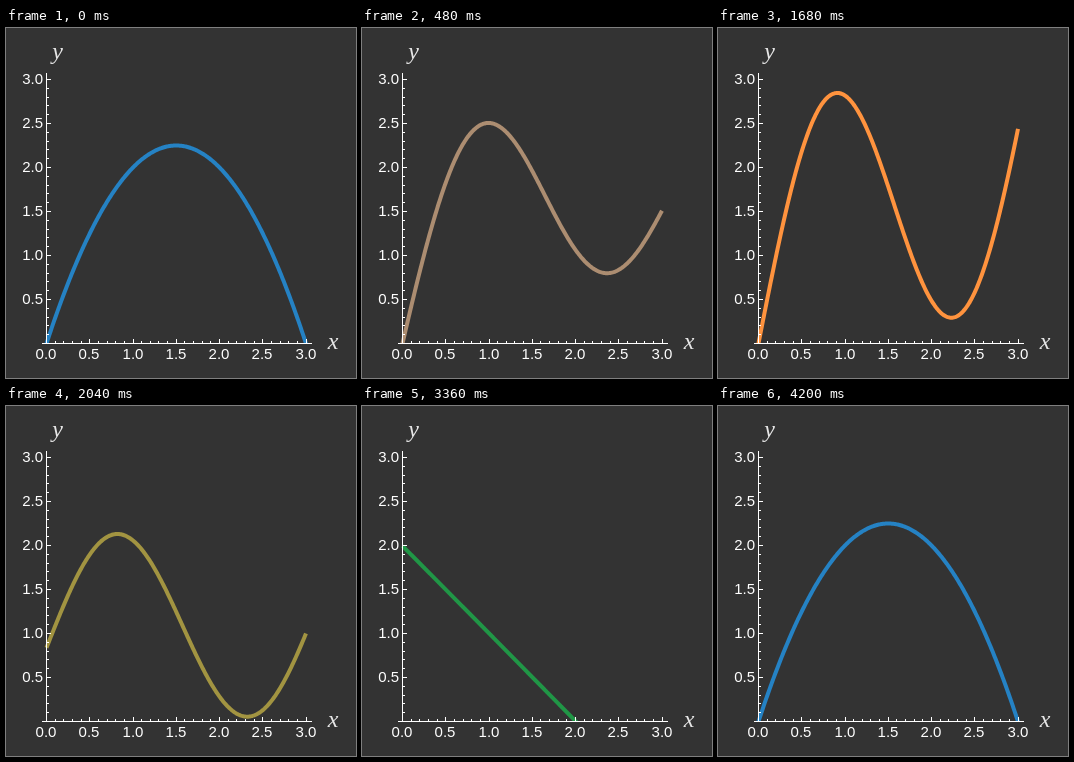
Write an HTML page with a canvas that moves like this. It is 350 by 350 pixels and loops after 5 s.

```html
<!DOCTYPE html>
<html lang="en">
<head>
<meta charset="utf-8">
<title>Morphing plots</title>
<style>
  html, body { margin: 0; width: 100%; height: 100%; overflow: hidden; background: #333; }
  canvas { display: block; width: 350px; height: 350px; }
</style>
</head>
<body>
<canvas id="stage" width="350" height="350"></canvas>
<script>
const ctx = document.getElementById('stage').getContext('2d');

const LOOP = 5000, STEP = 40;
const PHASE = LOOP / 3, MORPH = PHASE / 2;
const X0 = 40.5, Y0 = 315.5, UNIT_X = 86.5, UNIT_Y = 88;

const plots = [
  { f: x => 3 * x - x * x, rgb: [37, 130, 196] },
  { f: x => x + 2 * Math.sin(2 * x), rgb: [255, 147, 62] },
  { f: x => 2 - x, rgb: [32, 150, 70] }
];

const px = x => X0 + x * UNIT_X;
const py = y => Y0 - y * UNIT_Y;
const mix = (a, b, s) => a + (b - a) * s;
const ease = u => (1 - Math.cos(Math.PI * u)) / 2;

function drawCurve(time) {
  const i = Math.floor(time / PHASE);
  const s = ease(Math.min(1, (time - i * PHASE) / MORPH));
  const from = plots[i], to = plots[(i + 1) % plots.length];
  const rgb = from.rgb.map((c, k) => Math.round(mix(c, to.rgb[k], s)));

  ctx.save();
  ctx.beginPath();
  ctx.rect(35, 44, 271, 271.5);
  ctx.clip();
  ctx.beginPath();
  for (let k = 0; k <= 300; k++) {
    const x = k / 100;
    ctx.lineTo(px(x), py(mix(from.f(x), to.f(x), s)));
  }
  ctx.strokeStyle = `rgb(${rgb})`;
  ctx.lineWidth = 4;
  ctx.lineJoin = 'round';
  ctx.stroke();
  ctx.restore();
}

function drawAxes() {
  ctx.fillStyle = '#fff';
  ctx.fillRect(36, 315, 270, 1);
  ctx.fillRect(40, 45, 1, 271);

  ctx.font = '15px "Liberation Sans", Arial, sans-serif';
  for (let k = 0; k <= 30; k++) {
    const v = k / 10, major = k % 5 === 0, len = major ? 5 : 3;
    const x = Math.floor(px(v)), y = Math.floor(py(v));
    ctx.fillRect(x, 316 - len, 1, len);
    ctx.fillRect(40, y, len, 1);
    if (!major) continue;
    ctx.textAlign = 'center';
    ctx.fillText(v.toFixed(1), x, 331);
    ctx.textAlign = 'right';
    if (k) ctx.fillText(v.toFixed(1), 37, y + 5);
  }

  ctx.font = 'italic 24px "Liberation Serif", "Times New Roman", serif';
  ctx.fillStyle = '#e6e6e6';
  ctx.textAlign = 'center';
  ctx.fillText('x', 327, 321);
  ctx.fillText('y', 51.5, 31);
}

function render(now) {
  const time = Math.floor((now % LOOP) / STEP) * STEP;
  ctx.fillStyle = '#333';
  ctx.fillRect(0, 0, 350, 350);
  drawCurve(time);
  drawAxes();
}

const start = performance.now();
function tick() {
  render(performance.now() - start);
  requestAnimationFrame(tick);
}
tick();
</script>
</body>
</html>
```
